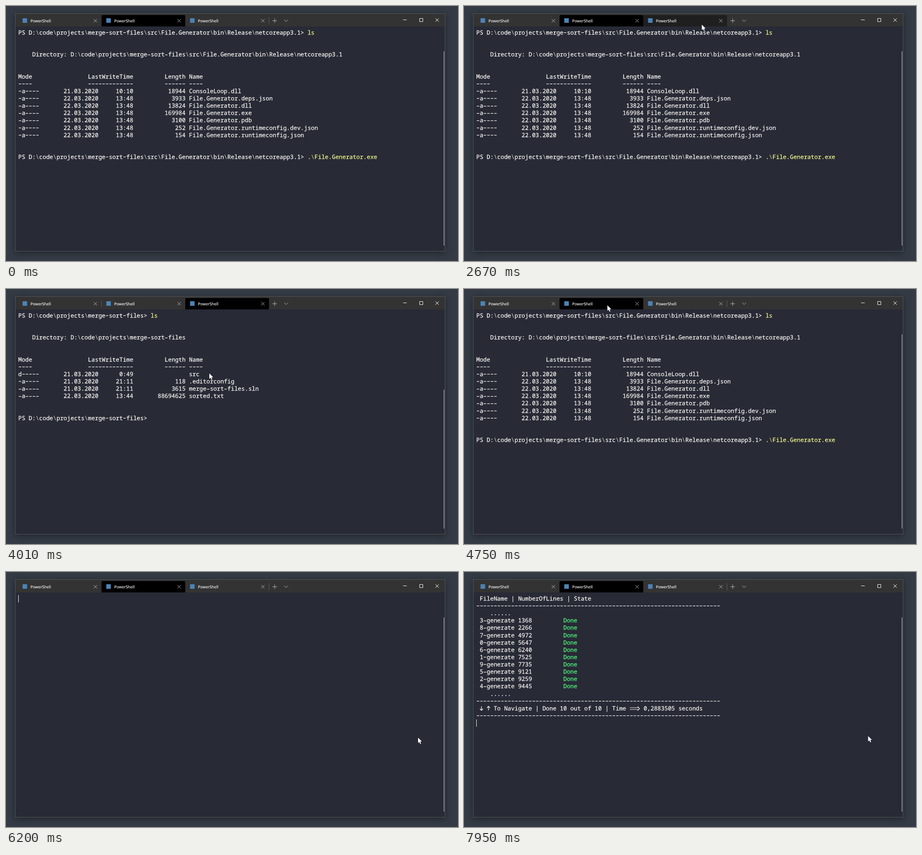
An HTML page with a canvas that plays this animation: 996 px wide and 562 px high, repeating every 8 s.

```html
<!DOCTYPE html>
<html lang="en">
<head>
<meta charset="utf-8">
<title>Terminal session</title>
<style>
  html, body { margin: 0; width: 100%; height: 100%; overflow: hidden; background: #343b45; }
  canvas { display: block; }
</style>
</head>
<body>
<canvas id="stage" width="996" height="562"></canvas>
<script>
const ctx = document.getElementById('stage').getContext('2d');
ctx.textRendering = 'geometricPrecision';

const LOOP = 8000, BLINK = 525;
const CELL_W = 7.68, CELL_H = 16.12, LEFT = 27, TOP = 51;
const TAB_W = 184.5, TAB_COUNT = 3;
const WHITE = '#f8f8f2', YELLOW = '#f1fa8c', GREEN = '#50fa7b';
const POINTER = new Path2D('M0 0V12L2.7 9.5L4.6 14L6.6 13.1L4.8 8.8L8.5 8.6Z');

const root = String.raw`D:\code\projects\merge-sort-files`;
const release = root + String.raw`\src\File.Generator\bin\Release\netcoreapp3.1`;

const rootFiles = `d----- 21.03.2020 0:49 - src
-a---- 21.03.2020 21:11 118 .editorconfig
-a---- 21.03.2020 21:11 3615 merge-sort-files.sln
-a---- 22.03.2020 13:44 88694625 sorted.txt`;

const releaseFiles = `-a---- 21.03.2020 10:10 18944 ConsoleLoop.dll
-a---- 22.03.2020 13:48 3933 File.Generator.deps.json
-a---- 22.03.2020 13:48 13824 File.Generator.dll
-a---- 22.03.2020 13:48 169984 File.Generator.exe
-a---- 22.03.2020 13:48 3100 File.Generator.pdb
-a---- 22.03.2020 13:48 252 File.Generator.runtimeconfig.dev.json
-a---- 22.03.2020 13:48 154 File.Generator.runtimeconfig.json`;

const rule = '-'.repeat(70);
const report = ` FileName | NumberOfLines | State
${rule}
    ......
 3-generate 1368         Done
 8-generate 2266         Done
 7-generate 4972         Done
 0-generate 5647         Done
 6-generate 6240         Done
 1-generate 7525         Done
 9-generate 7735         Done
 5-generate 9121         Done
 2-generate 9259         Done
 4-generate 9445         Done
    ......
${rule}
     To Navigate | Done 10 out of 10 | Time     0,2883505 seconds
${rule}`.split('\n');

// Each screen draws itself and returns the caret cell; the caret starts blinking at caretOn
const showRelease = () => listing(release, releaseFiles, String.raw`.\File.Generator.exe`);
const screens = [
  { from: 0, tab: 1, caretOn: LOOP, show: showRelease },
  { from: 3000, tab: 2, caretOn: 3310, show: () => listing(root, rootFiles, '') },
  { from: 4700, tab: 1, caretOn: 4800, show: showRelease },
  { from: 5820, tab: 1, caretOn: 5820, show: () => [0, showRelease()[1] + 1] },
  { from: 6060, tab: 1, caretOn: 6060, show: () => [0, 0] },
  { from: 6250, tab: 1, caretOn: 6900, show: age => table(7 + Math.floor(age / 45) * 5) }
];

// Pointer moves: start time, end time, destination
const START = [890, 566];
const moves = [
  [110, 720, 282, 31], [860, 1230, 715, 349],
  [2260, 2670, 524, 41], [2670, 2800, 504, 15], [2800, 2950, 494, 25],
  [3310, 4110, 446, 193], [4160, 4750, 316, 36], [4980, 5590, 908, 365], [7120, 7170, 890.5, 361.5]
];

function pointerAt(t) {
  return moves.reduce(([x, y], [from, to, toX, toY]) => {
    const u = Math.min(1, Math.max(0, (t - from) / (to - from)));
    const ease = u * u * (3 - 2 * u);
    return [x + (toX - x) * ease, y + (toY - y) * ease];
  }, START);
}

function rect(x, y, w, h, color) {
  ctx.fillStyle = color;
  ctx.fillRect(x, y, w, h);
}

function stroke(d, color = WHITE, width = 1) {
  ctx.strokeStyle = color;
  ctx.lineWidth = width;
  ctx.stroke(new Path2D(d));
}

function cross(x, y, color) {
  stroke(`M${x - 3.7} ${y - 3.7}l7.4 7.4m0 -7.4l-7.4 7.4`, color);
}

// A thin outline gives the glyphs a slightly heavier weight
function glyphs(text, x, y, color, weight) {
  ctx.fillStyle = ctx.strokeStyle = color;
  ctx.lineWidth = weight;
  ctx.fillText(text, x, y);
  ctx.strokeText(text, x, y);
}

// Terminal text on the character grid, with wide raised hyphens and faint backslashes
function print(col, row, text, color = WHITE) {
  ctx.font = '12.8px "Noto Sans Mono", "DejaVu Sans Mono", monospace';
  [...text].forEach((ch, i) => {
    if (ch === ' ') return;
    const x = LEFT + (col + i) * CELL_W, y = TOP + row * CELL_H + 12;
    ctx.globalAlpha = ch === '\\' ? 0.65 : 1;
    if (ch === '-') glyphs('–', x, y - 0.7, color, 0.25);
    else glyphs(ch, x, y, color, ch === '.' ? 0.5 : 0.25);
  });
  ctx.globalAlpha = 1;
}

function prompt(row, folder, command) {
  const text = `PS ${folder}> `;
  print(0, row, text);
  print(text.length, row, command, YELLOW);
  return [text.length + command.length, row];
}

function listing(folder, files, command) {
  const rows = files.split('\n');
  const header = 'Mode' + 'LastWriteTime'.padStart(29) + 'Length'.padStart(15) + ' Name';
  prompt(0, folder, 'ls');
  print(4, 3, 'Directory: ' + folder);
  print(0, 6, header);
  print(0, 7, header.replace(/\w/g, '-'));
  rows.forEach((line, i) => {
    const [mode, date, time, size, name] = line.split(' ');
    const length = size === '-' ? '' : size;
    print(0, 8 + i, mode.padEnd(13) + date + time.padStart(10) + length.padStart(15) + ' ' + name);
  });
  return prompt(10 + rows.length, folder, command);
}

function table(count) {
  report.slice(0, count).forEach((line, row) => {
    const state = line.endsWith('Done') ? 'Done' : '';
    const start = line.length - state.length;
    print(0, row, line.slice(0, start));
    print(start, row, state, GREEN);
  });
  if (count >= report.length) {
    stroke('M38.5 296v9m-3.5 -3.5l3.5 3.5l3.5 -3.5M54 305v-9m-3.5 3.5l3.5 -3.5l3.5 3.5', WHITE, 1.3);
    stroke('M365.5 299h19.5m-19.5 4h19.5m-2.5 -6.5l4.5 4.5l-4.5 4.5', WHITE, 1.2);
  }
  return [0, report.length];
}

function drawTab(i, active, hovered) {
  const x = 26 + i * TAB_W;
  const lit = k => k === active || k === hovered;
  if (lit(i)) {
    ctx.fillStyle = i === active ? '#000' : '#1f1f20';
    ctx.beginPath();
    ctx.roundRect(x, 20, TAB_W, 25, [2, 2, 0, 0]);
    ctx.fill();
  } else if (!lit(i + 1)) rect(Math.floor(x + TAB_W), 25, 1, 15, '#606060');
  rect(x + 10.5, 27, 10, 10, '#4c83b5');
  ctx.font = '8.7px "Open Sans", "Noto Sans", sans-serif';
  glyphs('PowerShell', x + 28, 36, '#fff', 0.15);
  cross(x + 171, 32.5, '#b8b8b8');
}

function drawWindow(active, hovered) {
  rect(0, 0, 996, 562, '#343b45');
  ctx.save();
  ctx.shadowColor = 'rgba(0,0,0,.4)';
  ctx.shadowBlur = 14;
  ctx.shadowOffsetY = 3;
  rect(20, 16, 948, 525, '#53565a');
  ctx.restore();
  rect(21, 17, 946, 28, '#333');
  rect(21, 45, 946, 495, '#282a36');

  for (let i = 0; i < TAB_COUNT; i++) drawTab(i, active, hovered);
  stroke('M587 32.5h10m-5 -5v10M613 30l4.3 4.3l4.3 -4.3', '#b8b8b8');
  stroke('M875 30.5h8M911.5 27.5h7v7h-7z', '#fff');
  cross(950, 31, '#fff');

  const thumbTop = active === 2 ? 222 : 100;
  rect(964.5, thumbTop, 1.5, 528 - thumbTop, '#a0a1a6');
}

function draw(t) {
  const screen = screens.findLast(s => t >= s.from);
  const [x, y] = pointerAt(t);
  const hovered = y >= 20 && y < 45 ? Math.floor((x - 26) / TAB_W) : -1;
  drawWindow(screen.tab, hovered);

  const [col, row] = screen.show(t - screen.from);
  const blinks = Math.floor((t - screen.caretOn) / BLINK);
  if (blinks >= 0 && blinks % 2 === 0) {
    rect(Math.round(LEFT + col * CELL_W), Math.round(TOP + row * CELL_H), 1, 16, WHITE);
  }

  ctx.save();
  ctx.translate(x, y);
  ctx.lineWidth = 1.2;
  ctx.strokeStyle = '#16171c';
  ctx.stroke(POINTER);
  ctx.fillStyle = '#fff';
  ctx.fill(POINTER);
  ctx.restore();
}

function tick() {
  draw(performance.now() % LOOP);
  requestAnimationFrame(tick);
}
tick();
</script>
</body>
</html>
```
